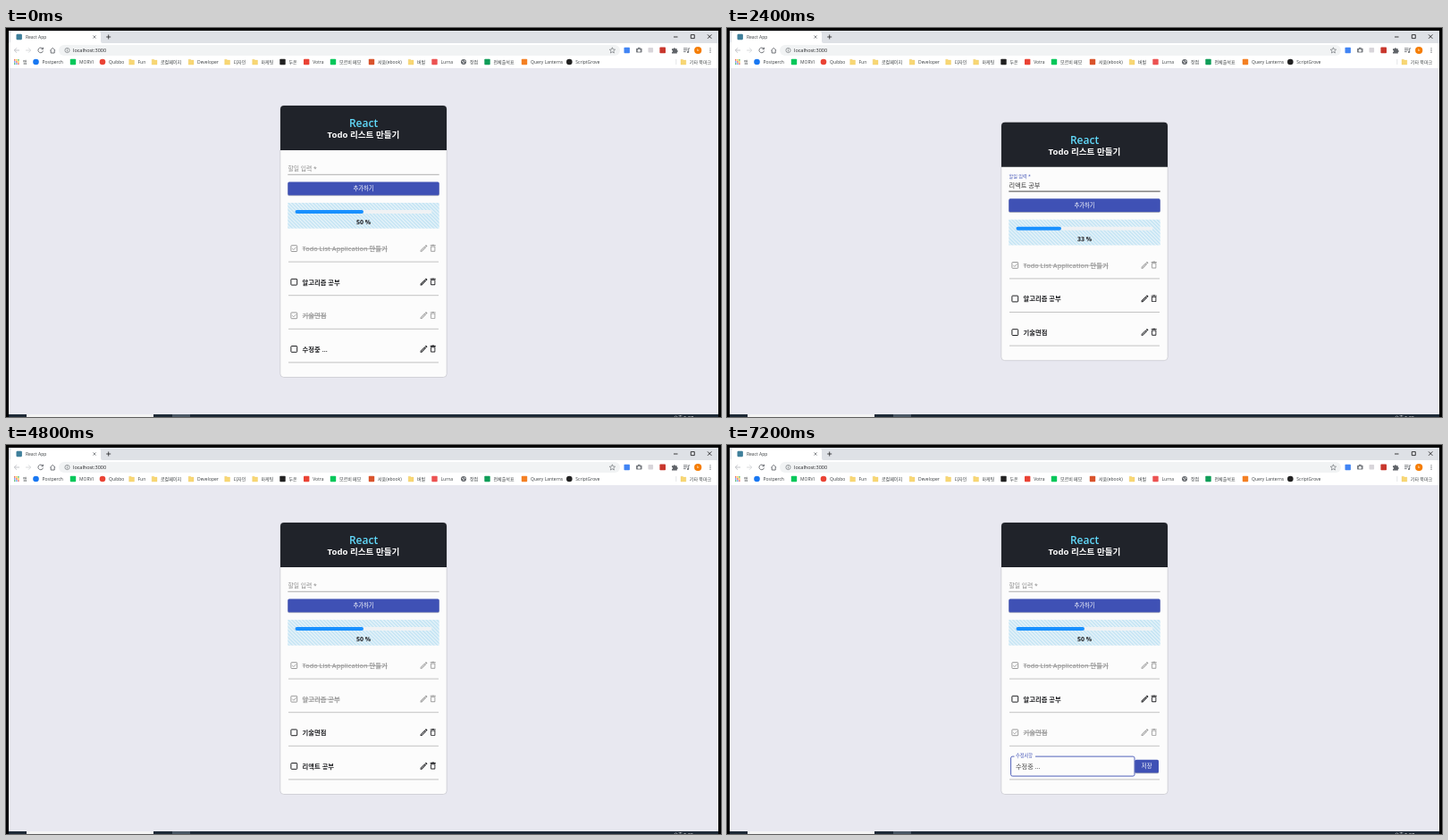
Write an HTML page that moves like this. It is 800 px wide and 436 px high and loops after 8400 ms.

```html
<!DOCTYPE html>
<html lang="ko">
<head>
<meta charset="utf-8">
<title>Todo</title>
<style>
  html, body { margin: 0; width: 100%; height: 100%; overflow: hidden; background: #000; }
  svg { display: block; }
  text { font-family: "Open Sans", "Noto Sans CJK KR", "Noto Sans CJK", sans-serif; white-space: pre; }
</style>
</head>
<body>
<svg id="stage" width="800" height="436" viewBox="0 0 800 436">
  <defs>
    <linearGradient id="fade"><stop stop-color="#dee1e6" stop-opacity="0"/><stop offset="1" stop-color="#dee1e6"/></linearGradient>
    <pattern id="stripes" width="2.8" height="2.8" patternUnits="userSpaceOnUse" patternTransform="rotate(-45)">
      <rect width="2.8" height="2.8" fill="#e9f4fa"/><rect width="1.4" height="2.8" fill="#bfe2f3"/>
    </pattern>
  </defs>
  <g id="browser"></g>
  <g id="tabs"></g>
  <g id="card"></g>
</svg>
<script>
const HOLD = 1200, BLUE = '#3f51b5', INK = '#202124', GREY = '#5f6368', FADED = '#9b9b9b';
const $ = id => document.getElementById(id);

const rect = (x, y, w, h, fill, rx = 0, more = '') =>
  `<rect x="${x}" y="${y}" width="${w}" height="${h}" fill="${fill}" rx="${rx}" ${more}/>`;
const circle = (x, y, r, fill, more = '') => `<circle cx="${x}" cy="${y}" r="${r}" fill="${fill}" ${more}/>`;
const line = (d, color, width = .8, more = '') =>
  `<path d="${d}" fill="none" stroke="${color}" stroke-width="${width}" ${more}/>`;
// y is the visual middle of the text
const text = (x, y, size, str, fill = INK, more = '') =>
  `<text x="${x}" y="${y + size * .36}" font-size="${size}" fill="${fill}" ${more}>${str}</text>`;
const MID = 'text-anchor="middle"';
const BOLD = 'font-weight="700"';

const square = color => x => rect(x - 3.2, 34.8, 6.4, 6.4, color, .8);
const disc = color => x => circle(x, 38, 3.3, color);
const folder = x => `<path d="M${x - 2.8} 35.2h2.2l.8 .9h2.8v5h-5.8z" fill="#f8d775" stroke="#e9c252" stroke-width=".3"/>`;

const apps = x => {
  const colors = ['#ea4335', '#fbbc04', '#34a853', '#4285f4'];
  let s = '';
  for (let i = 0; i < 9; i++)
    s += rect(x - 2.8 + i % 3 * 2.1, 35.2 + Math.floor(i / 3) * 2.1, 1.4, 1.4, colors[i % 4]);
  return s;
};

const globe = (x, y) => circle(x, y, 3, GREY) + line(`M${x - 2} ${y - 1}l2 1v2M${x + .5} ${y - 2}l1.5 2`, '#fff', .8);

const bookmarks = [
  [11.8, apps, '앱'], [33.5, disc('#1877f2'), 'Postperch'], [75, square('#03c75a'), 'MORVI'],
  [108, disc('#ea4335'), 'Quibbo'], [140.5, folder, 'Fun'], [166, folder, '로컬페이지'],
  [207, folder, 'Developer'], [247.5, folder, '디자인'], [278.5, folder, '마케팅'],
  [309.5, square('#222'), '두온'], [336.2, square('#ea4335'), 'Votra'], [366, square('#03c75a'), '모르비 메모'],
  [409, square('#d9532c'), '서움(ebook)'], [453, folder, '버벌'], [479.5, square('#ec5252'), 'Lurna'],
  [512, x => globe(x, 38), '장점'], [538.5, square('#0f9d58'), '전체출석표'], [580, square('#f48024'), 'Query Lanterns'],
  [630.3, disc('#222'), 'ScriptGrove'], [757.8, folder, '기타 북마크']
];

function drawBrowser() {
  let s = rect(3, 3, 794, 430, '#e8e8f0') + rect(3, 3, 794, 14, '#dee1e6') + rect(3, 17, 794, 28, '#fff');
  // window buttons
  s += line('M747 10h4.5M766.3 7.6h4v4h-4zM785 7.4l4.4 4.4m0-4.4l-4.4 4.4', '#111', .8);
  // navigation
  s += line('M15 25h-5.6m2.6-2.7l-2.7 2.7 2.7 2.7', '#b4b7bb');
  s += line('M22 25h5.6m-2.6-2.7l2.7 2.7-2.7 2.7', '#cfd1d4');
  s += line('M41 23.2a2.8 2.8 0 1 0 .5 2.4M41.5 21.8v2h-2', GREY, .9);
  s += line('M49.3 25.2l2.9-2.8 2.9 2.8M50.2 24.8v3.2h4v-3.2', GREY, .9);
  s += rect(59, 19, 628, 12, '#f1f3f4', 6);
  s += circle(68.5, 25, 2.6, 'none', `stroke="${GREY}" stroke-width=".6"`) + line('M68.5 24.6v1.8M68.5 23.3v.7', GREY, .7);
  s += text(75, 25, 5.5, 'localhost:3000');
  s += line('M678.4 21.8l.9 2.2 2.3.2-1.8 1.5.6 2.3-2-1.2-2 1.2.6-2.3-1.8-1.5 2.3-.2z', GREY, .6);
  // extensions
  s += rect(691.5, 21.8, 6.4, 6.4, '#4285f4', .8);
  s += rect(705, 22.8, 6.6, 4.8, '#7b7f84', .8) + rect(707, 21.8, 2.6, 1.4, '#7b7f84') + circle(708.3, 25.2, 1.5, '#fff');
  s += rect(718.5, 22, 5.6, 5.6, '#d8d5da', .8) + rect(731.4, 21.6, 6.6, 6.6, '#c8372d', .8);
  s += `<path d="M745 23.2h1.9a1 1 0 0 1 2 0h1.9v1.7a1 1 0 0 1 0 2v1.6h-5.8v-1.6a1 1 0 0 0 0-2z" fill="${GREY}"/>`;
  s += line('M758 22.8h4.5M758 24.7h4.5M758 26.6h2.7M763.7 27v-4.2h1.5', GREY, .8) + circle(763, 27, 1, GREY);
  s += circle(774.2, 25, 4.1, '#f57c00') + text(774.2, 25, 4, 'b', '#fff', MID);
  for (const y of [22.8, 25, 27.2]) s += circle(788, y, .65, GREY);
  // bookmarks
  for (const [x, icon, label] of bookmarks) s += icon(x) + text(x + 7, 38, 5, label, '#3c4043');
  s += line('M749.8 35v6', '#d0d3d7', .6);
  // taskbar
  s += rect(3, 433, 794, 3, '#1d2936') + rect(23, 433, 142, 3, '#f4f4f4') + rect(186, 433, 20, 3, '#4a5764');
  return s;
}

const tabClose = x => line(`M${x - 1.6} 8.4l3.2 3.2m0-3.2l-3.2 3.2`, GREY, .7);
const tabIcons = {
  video: x => rect(x - 3.2, 7.4, 6.4, 5.2, '#f00', 1),
  repo: x => circle(x, 10, 3.2, '#24292e'),
  globe: x => globe(x, 10)
};
const otherTabs = [
  ['video', 'Lets make a Tuvooni Headers page'],
  ['video', '(4) 한도율 서무진 - 봄 - Tuvooni'],
  ['repo', 'boramdeulsk/react_mission2_A'],
  ['repo', 'Editing Portfolio/README.md at'],
  ['globe', 'anigif.gif (800×436)']
];

function drawTabs({ many, clock }) {
  let s = '';
  if (many) otherTabs.forEach(([icon, label], i) => {
    const x = 14.3 + i * 99;
    s += tabIcons[icon](x) + tabClose(x + 85);
    s += `<svg x="${x + 7.3}" y="3" width="71" height="14">${text(0, 7, 5, label, '#3c4043')}${rect(60, 0, 11, 14, 'url(#fade)')}</svg>`;
    if (i < 4) s += line(`M${x + 91} 6.5v7`, '#9a9da2', .5);
  });
  const x = many ? 500 : 5, w = many ? 99 : 101, close = many ? 592.6 : 99;
  s += `<path d="M${x - 2} 17q2 0 2-2v-9q0-2 2-2h${w - 4}q2 0 2 2v9q0 2 2 2z" fill="#fff"/>`;
  const icon = many ? 508.7 : 14.7;
  s += rect(icon - 3.2, 6.8, 6.4, 6.4, '#3f7f9b', 1.2) + text(icon + 7.2, 10, 5, 'React App', '#3c4043') + tabClose(close);
  s += line(`M${close + 13.2} 10h5m-2.5-2.5v5`, INK, .8);
  return s + text(747, 437, 5.4, '오후 ' + clock, '#fff');
}

const PENCIL = 'M3 17.2V21h3.8L17.8 9.9l-3.7-3.7zM5 19v-.9l9.1-9.1.9.9L5.9 19zM15.1 5.1l3.8 3.8 1.8-1.9q.7-.7 0-1.4l-2.3-2.3q-.7-.7-1.4 0z';
const TRASH = 'M6 19q0 2 2 2h8q2 0 2-2V7H6zM8 9h8v10H8zM15.5 4l-1-1h-5l-1 1H5v2h14V4z';
const icon = (d, x, y, color) =>
  `<path d="${d}" transform="translate(${x - 5.2} ${y - 5.2}) scale(.435)" fill="${color}" fill-rule="evenodd"/>`;

const button = (x, y, w, h, label) =>
  rect(x, y + .8, w, h, 'rgba(0,0,0,.25)', 1.6) + rect(x, y, w, h, BLUE, 1.6) +
  text(x + w / 2, y + h / 2 - .2, 6.3, label, '#fff', MID + ' font-weight="500"');

function drawItem([label, done], y, editing) {
  const color = done ? FADED : INK;
  let s = line(`M316 ${y + 15}h168`, '#bdbdbd', .9);
  if (editing) {
    s += rect(317.6, y - 10.8, 138.4, 22, 'none', 1.8, `stroke="${BLUE}" stroke-width=".9"`);
    s += rect(321.5, y - 12, 23.5, 2.5, '#fcfcfc') + text(323, y - 11.3, 5.2, '수정사항', BLUE);
    return s + text(323, y + .6, 7.2, '수정중 ...', '#444') + button(456.3, y - 7.2, 26.7, 14.8, '저장');
  }
  s += rect(318.9, y - 3.4, 6.8, 6.8, 'none', .7, `stroke="${color}" stroke-width="1"`);
  if (done) s += line(`M320.3 ${y}l1.5 1.5 3-3.1`, color, .9);
  s += text(331.6, y + .3, 7.3, label, color, 'font-weight="600"' + (done ? ' text-decoration="line-through"' : ''));
  return s + icon(PENCIL, 467.5, y - .2, color) + icon(TRASH, 477.7, y - .4, color);
}

function drawCard({ items, value, editing }) {
  const height = 154.2 + items.length * 37.6, top = 239.2 - height / 2;
  const percent = Math.floor(items.filter(i => i[1]).length / items.length * 100);
  let s = rect(306.8, top, 186.4, height, '#fcfcfc', 4, 'stroke="#c4c4cc" stroke-width=".7"');
  s += `<path d="M307 ${top + 50}v-46q0-4 4-4h178q4 0 4 4v46z" fill="#20232a"/>`;
  s += text(400, top + 20, 12, 'React', '#61dafb', MID + ' font-weight="600"');
  s += text(400, top + 32.8, 9.6, 'Todo 리스트 만들기', '#fff', MID + ' ' + BOLD);
  // entry field
  if (value) {
    s += text(315.5, top + 60.2, 5.1, '할일 입력 *', BLUE) + text(315.5, top + 70.9, 7.2, value, '#333');
    s += line(`M315.3 ${top + 77.4}h169.4`, '#333', .9);
  } else {
    s += text(315.5, top + 70.7, 6.8, '할일 입력 *', '#8a8a8a') + line(`M315.3 ${top + 77.4}h169.4`, '#8f8f8f', .7);
  }
  s += button(315.3, top + 85.6, 169.4, 15, '추가하기');
  // progress
  s += rect(315.3, top + 109, 169.4, 28.8, 'url(#stripes)');
  s += rect(323.5, top + 117, 153, 4, '#f0f2f4', 2) + rect(323.5, top + 117, 153 * percent / 100, 4, '#1890ff', 2);
  s += text(400, top + 130.4, 7, percent + ' %', INK, MID + ' ' + BOLD);
  items.forEach((item, i) => s += drawItem(item, top + 160.2 + i * 37.6, editing === i));
  return s;
}

const list = (marks, ...extra) =>
  ['Todo List Application 만들기', '알고리즘 공부', '기술면접', ...extra].map((name, i) => [name, marks[i] === 'x']);
const ADDED = '리액트 공부', EDITED = '수정중 ...';
const scenes = [
  { items: list('x-x-', EDITED), clock: '5:37' },
  { items: list('x--'), many: true, clock: '5:35' },
  { items: list('x--'), value: ADDED, clock: '5:35' },
  { items: list('x---', ADDED), clock: '5:35' },
  { items: list('xx--', ADDED), clock: '5:35' },
  { items: list('xxxx', ADDED), clock: '5:36' },
  { items: list('x-x-', EDITED), editing: 3, clock: '5:37' }
];

$('browser').innerHTML = drawBrowser();
const start = performance.now();
let shown = -1;
function tick() {
  const now = Math.floor((performance.now() - start) / HOLD) % scenes.length;
  if (now !== shown) {
    shown = now;
    $('tabs').innerHTML = drawTabs(scenes[now]);
    $('card').innerHTML = drawCard(scenes[now]);
  }
  requestAnimationFrame(tick);
}
tick();
</script>
</body>
</html>
```
